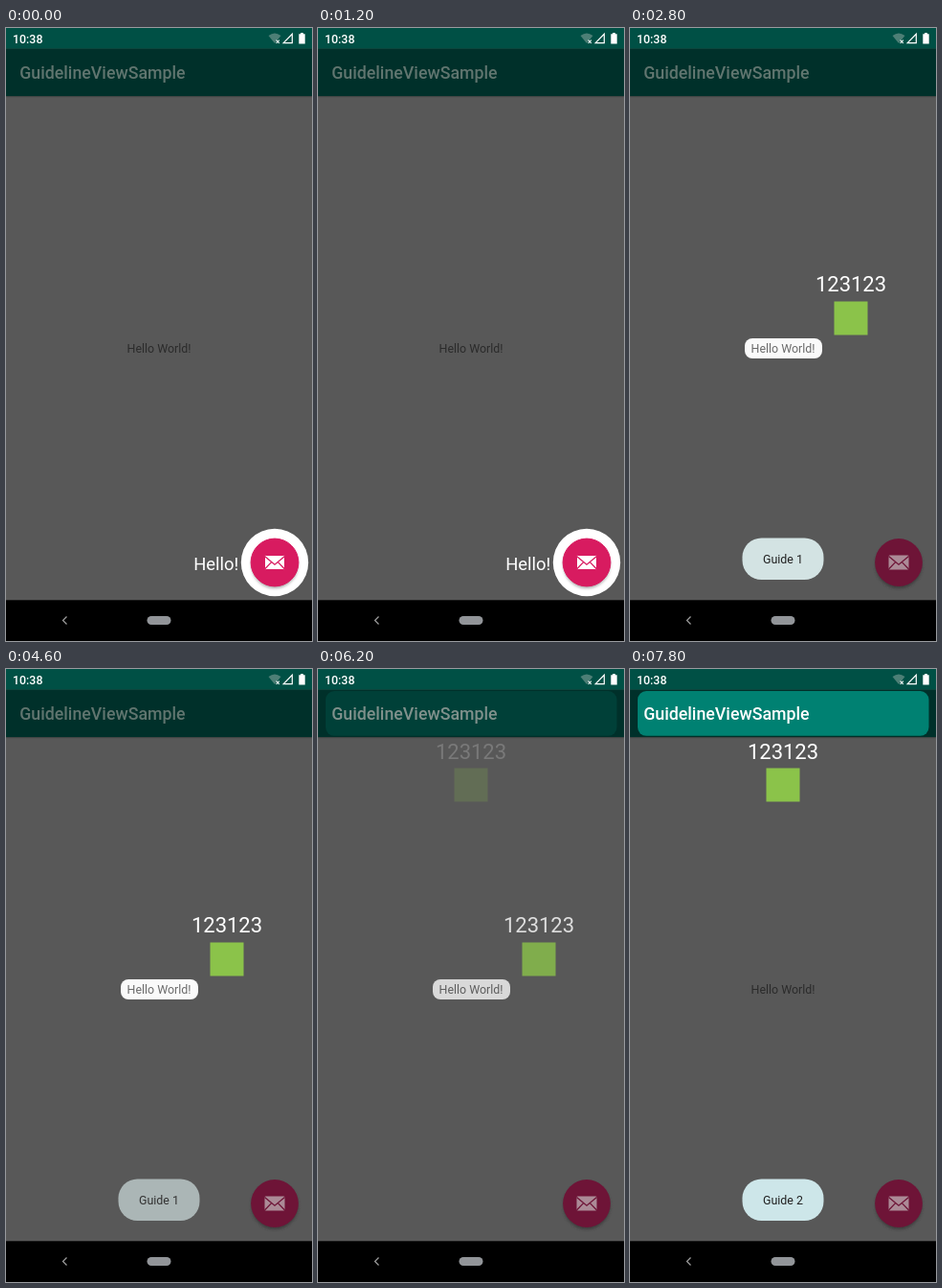
These frames come from a looping animation (320x640 px, 8 s). An HTML page:

```html
<!DOCTYPE html>
<html lang="en">
<head>
<meta charset="utf-8">
<title>Guideline walkthrough</title>
<style>
html, body { margin: 0; width: 100%; height: 100%; overflow: hidden; background: #585858; }
svg { display: block; width: 100vw; height: 100vh; font-family: Roboto, sans-serif; }
.bar { font-size: 17.8px; font-weight: 500; }
.body { font-size: 12.4px; }
.mid { text-anchor: middle; }
.guide, .toast { animation: 8s linear infinite both; }
#fab { animation-name: fab; }
#label { animation-name: label; }
#toolbar { animation-name: toolbar; }
#toast1 { animation-name: toast1; }
#toast2 { animation-name: toast2; }
@keyframes fab { 0%, 29.4% { opacity: 1 } 32.5%, 100% { opacity: 0 } }
@keyframes label { 0%, 29.4% { opacity: 0 } 32.5%, 76.9% { opacity: 1 } 80%, 100% { opacity: 0 } }
@keyframes toolbar { 0%, 76.9% { opacity: 0 } 80%, 100% { opacity: 1 } }
@keyframes toast1 { 0%, 30.6% { opacity: 0 } 34.4%, 56% { opacity: 1 } 60.75%, 100% { opacity: 0 } }
@keyframes toast2 { 0%, 77.5% { opacity: 0 } 81.25%, 100% { opacity: 1 } }
</style>
</head>
<body>
<svg viewBox="0 0 320 640">
  <defs>
    <filter id="soft" x="-30%" y="-30%" width="160%" height="160%"><feGaussianBlur stdDeviation="1.8"/></filter>
    <g id="mail">
      <circle r="24.9"/>
      <rect x="-10.5" y="-7.5" width="21" height="15" rx="1.2" fill="currentColor"/>
      <path d="M-10.5-6.5L0 2.2 10.5-6.5M-10.5 7L-3.4-.4M10.5 7L3.4-.4" fill="none" stroke-width="1.3"/>
    </g>
  </defs>

  <!-- dimmed page -->
  <rect width="320" height="640" fill="#585858"/>
  <rect y="71" width="320" height="1.2" fill="#484848"/>
  <rect y="21.3" width="320" height="49.8" fill="#00302a"/>
  <text class="bar" x="14.2" y="53" fill="#60756f">GuidelineViewSample</text>
  <text class="body mid" x="160" y="339.3" fill="#2b2b2b">Hello World!</text>
  <circle cx="281" cy="560.5" r="24.5" fill="#333" opacity=".7" filter="url(#soft)"/>
  <use href="#mail" x="281" y="558" fill="#6e1437" stroke="#6e1437" stroke-width="0" color="#ac8b97"/>

  <!-- system bars -->
  <rect width="320" height="21.5" fill="#005045"/>
  <text class="body" x="7" y="15.5" font-weight="500" fill="#fff">10:38</text>
  <path d="M274.5 8Q281 3 287.5 8L281 16Z" fill="#4d7f76"/>
  <path d="M282.6 12.6l3.2 3.2m0-3.2l-3.2 3.2" stroke="#fff" stroke-width="1.1"/>
  <path d="M290.2 15.6H299.3V6.3Z" fill="none" stroke="#fff" stroke-width="1.2"/>
  <path d="M306.3 6.3h1.8V5h2.8v1.3h1.8V16.6h-6.4Z" fill="#fff"/>
  <rect y="597.3" width="320" height="43" fill="#000"/>
  <path d="M63.5 614.5l-4 4 4 4" fill="none" stroke="#a0a0a0" stroke-width="1.2"/>
  <rect x="147.5" y="614" width="25" height="9" rx="4.5" fill="#929599"/>

  <g id="fab" class="guide">
    <circle cx="281" cy="558" r="35.2" fill="#fff"/>
    <circle cx="281" cy="560.5" r="24.5" fill="#999" opacity=".8" filter="url(#soft)"/>
    <use href="#mail" x="281" y="558" fill="#d81b60" stroke="#d81b60" color="#fff"/>
    <text class="mid" x="219.7" y="565.5" font-size="18.4" fill="#fff">Hello!</text>
  </g>

  <g id="label" class="guide">
    <rect x="120" y="324" width="81" height="21" rx="8" fill="#fafafa"/>
    <text class="body mid" x="160" y="339.3" fill="#6b6b6b">Hello World!</text>
    <text class="mid" x="231" y="275.3" font-size="22" fill="#fff">123123</text>
    <rect x="213.5" y="285.5" width="35" height="35" fill="#8bc34a"/>
  </g>

  <g id="toolbar" class="guide">
    <rect x="8" y="23" width="304.5" height="46.8" rx="9" fill="#008172"/>
    <text class="bar" x="14.2" y="53" fill="#fff">GuidelineViewSample</text>
    <text class="mid" x="160" y="94" font-size="22" fill="#fff">123123</text>
    <rect x="142.5" y="103.5" width="35" height="35" fill="#8bc34a"/>
  </g>

  <g id="toast1" class="toast">
    <rect x="117.5" y="532.5" width="85" height="43.5" rx="20" fill="#d3e3e3"/>
    <text class="body mid" x="160" y="559.2" fill="#222">Guide 1</text>
  </g>
  <g id="toast2" class="toast">
    <rect x="117.5" y="532.5" width="85" height="43.5" rx="20" fill="#cde6e9"/>
    <text class="body mid" x="160" y="559.2" fill="#222">Guide 2</text>
  </g>
</svg>
</body>
</html>
```
